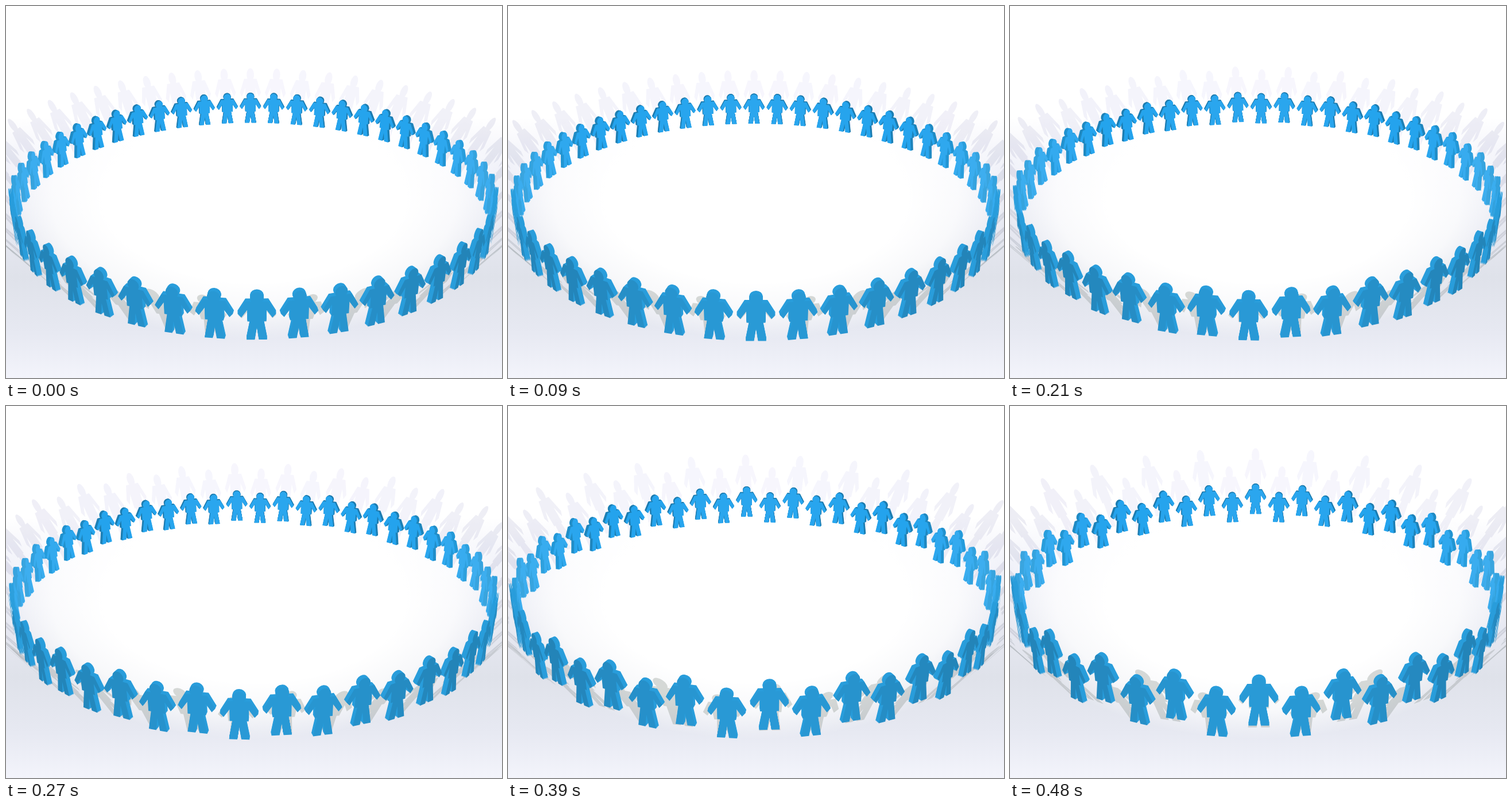
An HTML page without scripts for the animation above (510 ms loop, 864x648 px).

```html
<!DOCTYPE html>
<html lang="en">
<head>
<meta charset="utf-8">
<title>Ring of paper people</title>
<style>
@property --turn { syntax: "<angle>"; inherits: true; initial-value: 0deg }
@property --lift { syntax: "<number>"; inherits: true; initial-value: 0 }
@property --hop { syntax: "<number>"; inherits: true; initial-value: 0 }
@property --S { syntax: "<number>"; inherits: true; initial-value: 0 }
@property --C { syntax: "<number>"; inherits: true; initial-value: 0 }
@property --J { syntax: "<number>"; inherits: true; initial-value: 0 }
@property --Z { syntax: "<number>"; inherits: true; initial-value: 1 }
@property --X { syntax: "<number>"; inherits: true; initial-value: 0 }
@property --Y { syntax: "<number>"; inherits: true; initial-value: 0 }
@property --m { syntax: "<number>"; inherits: true; initial-value: 1 }
@property --rx { syntax: "<number>"; inherits: true; initial-value: 0 }
@property --ry { syntax: "<number>"; inherits: true; initial-value: 0 }
@property --q0 { syntax: "<number>"; inherits: true; initial-value: 1 }
@property --q1 { syntax: "<number>"; inherits: true; initial-value: 1 }
@property --w0 { syntax: "<number>"; inherits: true; initial-value: 1 }
@property --w1 { syntax: "<number>"; inherits: true; initial-value: 1 }

html, body { margin: 0; width: 100%; height: 100%; overflow: hidden; background: #fff }
svg { display: block; width: 864px; height: 648px; --solid: visible; --shadow: hidden; animation: ring 510ms infinite }
.shadows { --solid: hidden; --shadow: visible }

@keyframes ring {
  0% { --turn: -.4deg; --lift: 0; --hop: 0; animation-timing-function: steps(3) }
  17.647% { --turn: .1deg; --lift: -.005; --hop: 0; animation-timing-function: steps(4) }
  41.176% { --turn: 1.75deg; --lift: -.003; --hop: .0085; animation-timing-function: steps(2) }
  52.941% { --turn: 2.7deg; --lift: 0; --hop: .014; animation-timing-function: steps(2) }
  64.705% { --turn: 3.85deg; --lift: .0017; --hop: .0225; animation-timing-function: steps(2) }
  76.47% { --turn: 5.25deg; --lift: .0035; --hop: .0325; animation-timing-function: steps(3) }
  94.117%, 100% { --turn: 7.45deg; --lift: .0065; --hop: .045 }
}

/* The ring has radius 1; a camera tilted by 24.7 degrees projects each person. */
.man {
  --S: sin(var(--k) * 7.5deg + var(--turn));
  --C: cos(var(--k) * 7.5deg + var(--turn));
  --J: calc(var(--lift) + var(--hop) * (1 - cos(var(--k) * 180deg)) / 2);
  --Z: calc(3.134 + .9085 * var(--C) - .418 * (var(--J) + .085));
  --X: calc(var(--S) / var(--Z));
  --Y: calc((.0289 - .418 * var(--C) - .9085 * (var(--J) + .085)) / var(--Z));
  --m: calc(1.567 / var(--Z));
  --pose: matrix(
    calc(var(--m) * (var(--C) + .9085 * var(--X) * var(--S))),
    calc(var(--m) * var(--S) * (.418 + .9085 * var(--Y))),
    calc(var(--m) * var(--X) * -.418),
    calc(var(--m) * (.9085 - .418 * var(--Y))),
    calc(430.5 - 2.5 * var(--C) + 1238 * var(--X)),
    calc(324 + 1263 * var(--Y))) translate(0, 68.5px);
  /* screen step through the thickness of the body */
  --rx: calc(var(--out) * 2.34 * var(--m) * (var(--S) - .9085 * var(--X) * var(--C)));
  --ry: calc(var(--out) * -2.34 * var(--m) * var(--C) * (.418 + .9085 * var(--Y)));
  /* shadow on the floor, from a low lamp in front of the ring */
  --q0: calc(.54 / (.54 - var(--J)));
  --q1: calc(.54 / (.37 - var(--J)));
  --w0: calc(1 / (1.95 + (var(--C) + 1.5) * var(--q0)));
  --w1: calc(1 / (1.95 + (var(--C) + 1.5) * var(--q1)));
  --cast: matrix(
    calc(1.725 * var(--w0) * var(--q0) * (var(--C) + var(--S) * var(--S) * var(--q0) * var(--w0))),
    calc(2.536 * var(--w0) * var(--w0) * var(--q0) * var(--S)),
    calc(9.93 * var(--S) * (var(--q0) * var(--w0) - var(--q1) * var(--w1))),
    calc(14.92 * (var(--w0) - var(--w1))),
    calc(430.5 - 2.5 * var(--C) + 1360 * var(--S) * var(--q0) * var(--w0)),
    calc(2044 * var(--w0) - 257));
  --dark: rgb(calc(135 + 25 * var(--C)) calc(138 + 17 * var(--C)) calc(170 + 60 * var(--C)) / calc(.18 - .09 * var(--C)));
}
.far { --out: -1 }
.near { --out: 1 }
.far .man {
  --face: hsl(202 85% calc(55% - 4% * var(--S) * var(--S) + 8% * pow(var(--S), 8)));
  --side: hsl(201 72% calc(40% + 15% * pow(var(--S), 8)));
}
.near .man {
  --face: hsl(201 68% calc(50% - 7% * pow(sin(2 * (var(--k) * 7.5deg + var(--turn))), 2)));
  --side: hsl(201 71% 51%);
}
.solid { visibility: var(--solid) }
.shade { visibility: var(--shadow); transform: var(--cast); fill: var(--dark) }
.slab {
  transform: translate(calc(var(--rx) * var(--n) * 1px), calc(var(--ry) * var(--n) * 1px)) var(--pose);
  fill: var(--side);
}
.face { fill: var(--face) }
</style>
</head>
<body>
<svg viewBox="0 0 864 648">
  <defs>
    <linearGradient id="floor" x2="0" y2="1">
      <stop offset=".3" stop-color="#fff"/>
      <stop offset=".44" stop-color="#f0f1f9"/>
      <stop offset=".6" stop-color="#e6e8f1"/>
      <stop offset=".73" stop-color="#dfe2ea"/>
      <stop offset=".88" stop-color="#e7e9f2"/>
      <stop offset="1" stop-color="#f3f4fb"/>
    </linearGradient>
    <radialGradient id="glow">
      <stop offset=".6" stop-color="#fff"/>
      <stop offset=".8" stop-color="#fff" stop-opacity=".75"/>
      <stop offset="1" stop-color="#fff" stop-opacity="0"/>
    </radialGradient>
    <path id="body" d="M-28-110H-13A16.5 16.5 0 1 1 13-110H28L47-75 38-64 23-87V-53H16L25 0H5L0-36-5 0H-25L-16-53H-23V-87L-38-64-47-75Z"/>
    <g id="man">
      <use class="shade" href="#body"/>
      <g class="solid">
        <use class="slab" href="#body" style="--n:-3"/>
        <use class="slab" href="#body" style="--n:-2"/>
        <use class="slab" href="#body" style="--n:-1"/>
        <use class="slab" href="#body" style="--n:0"/>
        <use class="slab" href="#body" style="--n:1"/>
        <use class="slab" href="#body" style="--n:2"/>
        <use class="slab face" href="#body" style="--n:3"/>
      </g>
    </g>
  </defs>
  <rect width="864" height="648" fill="url(#floor)"/>
  <ellipse cx="432" cy="335" rx="440" ry="245" fill="url(#glow)"/>
  <use class="shadows" href="#ring"/>
  <g id="ring">
    <g class="far">
      <use class="man" href="#man" style="--k:0"/>
      <use class="man" href="#man" style="--k:1"/>
      <use class="man" href="#man" style="--k:-1"/>
      <use class="man" href="#man" style="--k:2"/>
      <use class="man" href="#man" style="--k:-2"/>
      <use class="man" href="#man" style="--k:3"/>
      <use class="man" href="#man" style="--k:-3"/>
      <use class="man" href="#man" style="--k:4"/>
      <use class="man" href="#man" style="--k:-4"/>
      <use class="man" href="#man" style="--k:5"/>
      <use class="man" href="#man" style="--k:-5"/>
      <use class="man" href="#man" style="--k:6"/>
      <use class="man" href="#man" style="--k:-6"/>
      <use class="man" href="#man" style="--k:7"/>
      <use class="man" href="#man" style="--k:-7"/>
      <use class="man" href="#man" style="--k:8"/>
      <use class="man" href="#man" style="--k:-8"/>
      <use class="man" href="#man" style="--k:9"/>
      <use class="man" href="#man" style="--k:-9"/>
      <use class="man" href="#man" style="--k:10"/>
      <use class="man" href="#man" style="--k:-10"/>
      <use class="man" href="#man" style="--k:11"/>
      <use class="man" href="#man" style="--k:-11"/>
      <use class="man" href="#man" style="--k:12"/>
      <use class="man" href="#man" style="--k:-12"/>
      <use class="man" href="#man" style="--k:13"/>
      <use class="man" href="#man" style="--k:-13"/>
      <use class="man" href="#man" style="--k:14"/>
      <use class="man" href="#man" style="--k:-14"/>
    </g>
    <g class="near">
      <use class="man" href="#man" style="--k:15"/>
      <use class="man" href="#man" style="--k:-15"/>
      <use class="man" href="#man" style="--k:16"/>
      <use class="man" href="#man" style="--k:-16"/>
      <use class="man" href="#man" style="--k:17"/>
      <use class="man" href="#man" style="--k:-17"/>
      <use class="man" href="#man" style="--k:18"/>
      <use class="man" href="#man" style="--k:-18"/>
      <use class="man" href="#man" style="--k:19"/>
      <use class="man" href="#man" style="--k:-19"/>
      <use class="man" href="#man" style="--k:20"/>
      <use class="man" href="#man" style="--k:-20"/>
      <use class="man" href="#man" style="--k:21"/>
      <use class="man" href="#man" style="--k:-21"/>
      <use class="man" href="#man" style="--k:22"/>
      <use class="man" href="#man" style="--k:-22"/>
      <use class="man" href="#man" style="--k:23"/>
      <use class="man" href="#man" style="--k:-23"/>
      <use class="man" href="#man" style="--k:24"/>
    </g>
  </g>
</svg>
</body>
</html>
```
